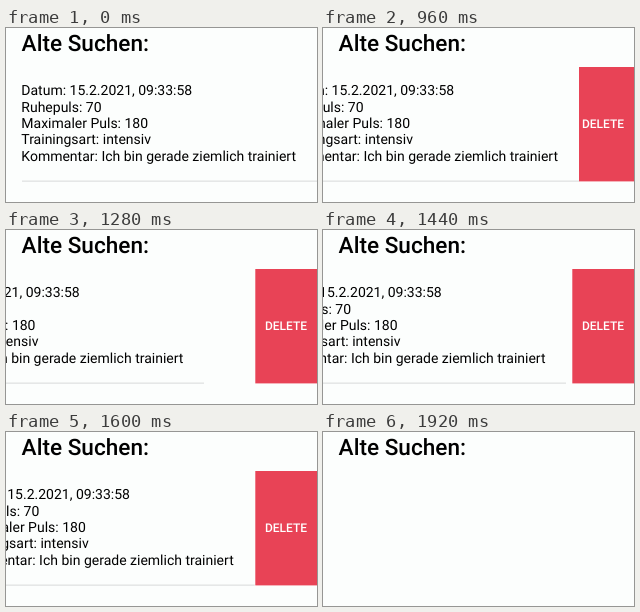
An HTML page that plays this animation: 311 px wide and 174 px high, repeating every 2.8 s.

```html
<!DOCTYPE html>
<html lang="de">
<head>
<meta charset="utf-8">
<style>
html, body { margin: 0; width: 100%; height: 100%; overflow: hidden; background: #fcfefd; }
svg { display: block; width: 100%; height: 100%; font: 14px Roboto, sans-serif; text-rendering: geometricPrecision; }
.title { font-size: 22.6px; font-weight: 500; }
.button { font-size: 12px; font-weight: 500; fill: #fff; text-anchor: middle; }
</style>
</head>
<body>
<svg viewBox="0 0 311 174">
  <text class="title" x="15.6" y="23">Alte Suchen:</text>
  <g id="row">
    <rect x="249.3" y="39" width="61.7" height="114.4" fill="#e84356"/>
    <text class="button" x="280" y="100">DELETE</text>
    <g id="item">
      <rect y="38" width="311" height="116" fill="#fcfefd"/>
      <rect x="16" y="152.6" width="295" height="1" fill="#d8d9d9"/>
      <text id="lines"></text>
    </g>
  </g>
</svg>
<script>
const LOOP = 2800, STEP = 80, RELEASE = 1215, REMOVE = 1840;
const byId = id => document.getElementById(id);
const row = byId('row'), item = byId('item');

byId('lines').innerHTML = [
  'Datum: 15.2.2021, 09:33:58',
  'Ruhepuls: 70',
  'Maximaler Puls: 180',
  'Trainingsart: intensiv',
  'Kommentar: Ich bin gerade ziemlich trainiert'
].map((s, i) => `<tspan x="15.3" y="${67.2 + i * 16.4}">${s}</tspan>`).join('');

// Finger drag to the left, then the row springs back to the open position
const at = (t, x, easing = 'linear') =>
  ({ offset: t / LOOP, transform: `translateX(${-x}px)`, easing });
const slide = item.animate([
  at(0, 0),
  at(880, 0),
  at(960, 55),
  at(1040, 108),
  at(1120, 133),
  at(RELEASE, 134, 'cubic-bezier(.36, .66, .04, 1)'),
  at(RELEASE + 500, 61.7),
  at(LOOP, 61.7)
], { duration: LOOP, fill: 'both' });
slide.pause();

const start = performance.now();
function draw() {
  const time = (performance.now() - start) % LOOP;
  const t = Math.floor(time / STEP) * STEP;
  slide.currentTime = t;
  row.style.opacity = t < REMOVE ? 1 : t < REMOVE + STEP ? 0.5 : 0;
  requestAnimationFrame(draw);
}
draw();
</script>
</body>
</html>
```
